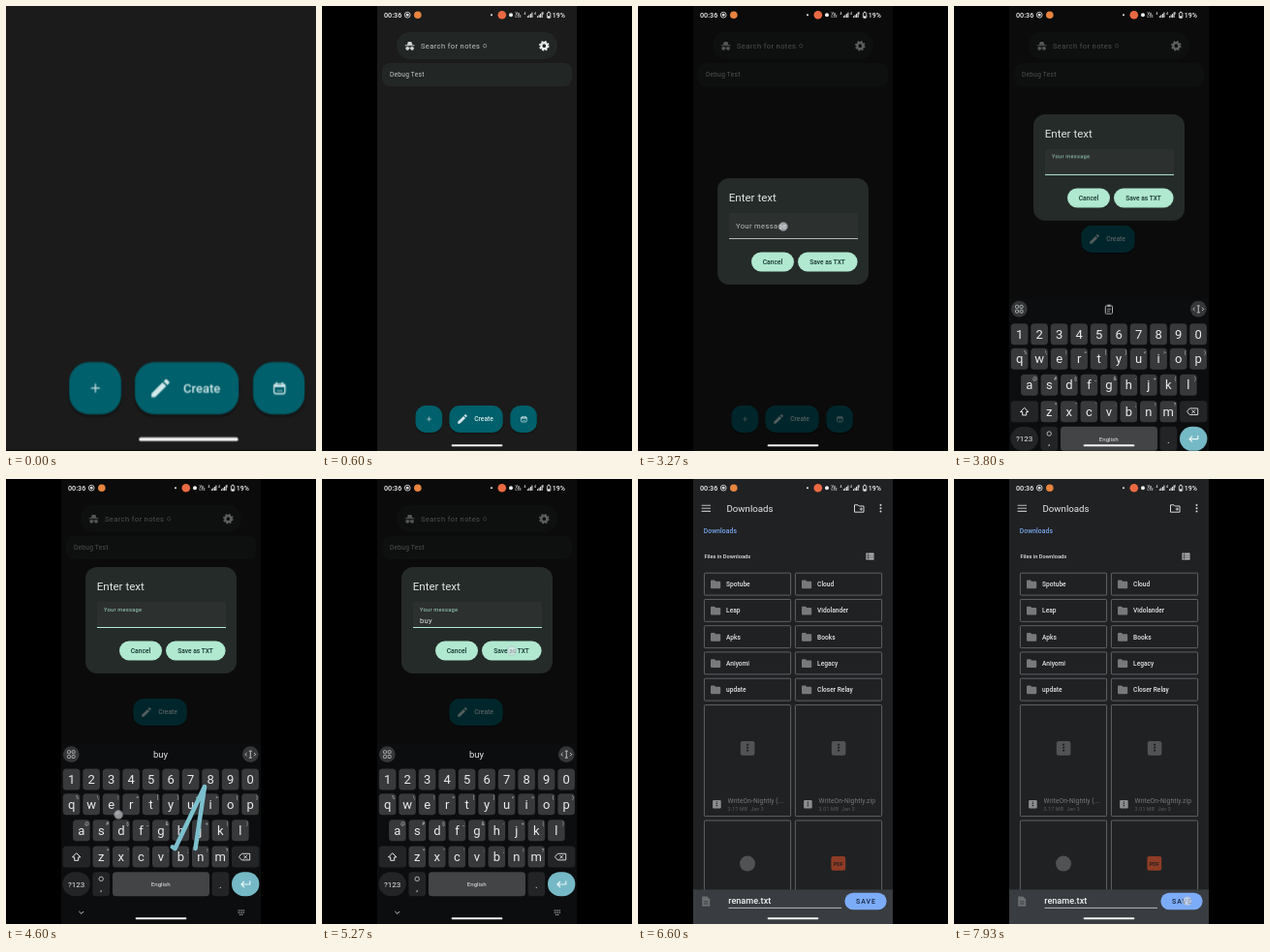
Write an HTML page that moves like this. It is 320 px wide and 460 px high and loops after 8 s.

```html
<!DOCTYPE html>
<html lang="en">
<head>
<meta charset="utf-8">
<title>Save a note as text</title>
<style>
  html, body { margin: 0; width: 100%; height: 100%; overflow: hidden; background: #000; }
  svg { display: block; width: 100vw; height: 100vh; }
  text { font-family: Roboto, "Noto Sans", sans-serif; white-space: pre; }
</style>
</head>
<body>
<svg id="stage" viewBox="0 0 320 460"></svg>
<script>
const LOOP = 8000;

// Drawing helpers
const rect = (x, y, w, h, r, fill, more = '') =>
  `<rect x="${x}" y="${y}" width="${w}" height="${h}" rx="${r}" fill="${fill}" ${more}/>`;
const disc = (x, y, r, fill, more = '') =>
  `<circle cx="${x}" cy="${y}" r="${r}" fill="${fill}" ${more}/>`;
const line = (d, stroke, width = 1, more = '') =>
  `<path d="${d}" fill="none" stroke="${stroke}" stroke-width="${width}" ${more}/>`;
const shape = (d, fill, more = '') => `<path d="${d}" fill="${fill}" ${more}/>`;
const text = (x, y, size, str, fill, { weight = 400, gap = 0, anchor = 'start' } = {}) =>
  `<text x="${x}" y="${y}" font-size="${size}" fill="${fill}" font-weight="${weight}"
    letter-spacing="${gap}" text-anchor="${anchor}">${str}</text>`;
const group = (id, ...parts) => `<g id="${id}">${parts.join('')}</g>`;
const esc = s => s.replace('&', '&amp;').replace('<', '&lt;');

const MID = { anchor: 'middle' };
const BOLD = { weight: 500 };

// Notes screen
const TEAL = '#00606b', ICE = '#d3e9ec', CARD = '#222725';

const fab = (x, w) =>
  rect(x - .5, 414.2, w + 1, 28.3, 11, '#000', 'opacity=".22"') +
  rect(x, 413.1, w, 27.8, 10.5, TEAL);

const gear = (x, y, c) =>
  disc(x, y, 3, 'none', `stroke="${c}" stroke-width="2.3"`) +
  disc(x, y, 4.5, 'none', `stroke="${c}" stroke-width="1.5" stroke-dasharray="2 1.534"`);

const pencil = shape(
  'M3 17.25V21h3.75L17.81 9.94l-3.75-3.75zM20.7 7a1 1 0 0 0 0-1.4l-2.3-2.3a1 1 0 0 0-1.4 0l-1.9 1.8 3.8 3.8z',
  ICE, 'transform="translate(138.6 420.6) scale(.535)"');

const hat =
  shape('M87.8 40.2l1-3.2h3.6l1 3.2z', '#d2d6d4') +
  rect(85.7, 40.2, 9.8, 1.1, .5, '#d2d6d4') +
  disc(88.2, 43.8, 1.9, '#d2d6d4') + disc(93, 43.8, 1.9, '#d2d6d4') +
  line('M89 43.4h3', '#d2d6d4', .8);

const notes =
  rect(57, 0, 206, 460, 0, '#1b1b1b') +
  rect(77, 27, 166, 28, 14, CARD) + hat +
  text(102, 43.8, 7.5, 'Search for notes', '#c2c7c4', { gap: .4 }) +
  rect(166.6, 39.4, 3, 3.6, 1.4, 'none', 'stroke="#a9aeab" stroke-width=".7"') +
  gear(229.3, 41.2, '#eceeed') +
  rect(62, 59, 196, 24, 8, CARD) +
  text(70, 73.4, 6.6, 'Debug Test', '#c6ccc9', { gap: .25 }) +
  group('sideFabs',
    fab(96.5, 27.7), line('M108.1 427h4.7M110.45 424.6v4.8', ICE, .6),
    fab(194.3, 27.5),
    rect(205.5, 424.8, 5.8, 5.2, 1.2, 'none', `stroke="${ICE}" stroke-width=".7"`),
    line('M205.5 425.9h5.8', ICE, 1.1), line('M206.9 423.8v1.4M209.9 423.8v1.4', ICE, .7),
    line('M207 428.4h3', ICE, .8, 'opacity=".5"')) +
  group('create', fab(131.4, 55.3), pencil, text(157.2, 429.4, 6.7, 'Create', ICE, BOLD));

// Dialog
const MINT = '#b0e8d0';
const dialog = group('dialog',
  rect(82, 178, 156, 110, 12, '#252b28'),
  text(93.7, 202.2, 11.6, 'Enter text', '#dfe4e1'),
  shape('M94 241v-25q0-2 2-2h129q2 0 2 2v25z', '#2c302e'),
  line('M94 240.5h133', '#bfc8c3', .9),
  group('focusLine', line('M94 240.5h133', '#b4e6dc', 1.2)),
  `<g id="label">${text(0, 0, 7.6, 'Your message', 'currentColor', { gap: .36 })}</g>`,
  group('typed', text(101, 236.2, 7.6, 'buy', '#dfe4e1', { gap: .3 })),
  rect(117, 254.5, 44, 20, 10, MINT), rect(165, 254.5, 61.6, 20, 10, MINT),
  text(139, 266.9, 6.7, 'Cancel', '#12332b', { ...BOLD, ...MID }),
  text(195.6, 266.9, 6.6, 'Save as TXT', '#12332b', { ...BOLD, ...MID }));

// Keyboard
const KEY = '#37393b', INK = '#e9ebec';
const keyRow = (letters, hints, x0, y) => [...letters].map((ch, i) => {
  const x = x0 + i * 20.5;
  return rect(x - 8.8, y - 11, 17.6, 22, 3.5, KEY) +
    text(x, y + 4.6, 13, ch, INK, MID) +
    (hints ? text(x + 7.8, y - 5, 5, esc(hints[i]), '#c3c6c8', { anchor: 'end' }) : '');
}).join('');

const keyboard = group('keyboard',
  rect(57, 274, 206, 187, 0, '#0c0d0e'),
  disc(67.3, 284.6, 8.4, '#343638'), disc(252.3, 284.6, 8.4, '#343638'),
  [[65, 282.2], [69.6, 282.2], [65, 287], [69.6, 287]].map(([x, y]) =>
    rect(x - 1.5, y - 1.5, 3, 3, .8, 'none', 'stroke="#c6c9cb" stroke-width=".8"')).join(''),
  line('M252.3 281.5v6.4M250.8 281.2h3M250.8 288.2h3M248.6 283l-1.7 1.7 1.7 1.7M256 283l1.7 1.7-1.7 1.7', '#d0d3d5', .9),
  group('clip',
    rect(156.3, 281.2, 7.2, 8.2, 1, 'none', 'stroke="#c6c9cb" stroke-width=".9"'),
    line('M158.3 281.2h3.2', '#c6c9cb', 1.8), line('M158 284.7h4M158 286.9h3', '#c6c9cb', .8)),
  group('hint', text(159.5, 288, 9.5, 'buy', '#dfe2e4', MID)),
  keyRow('1234567890', '', 67.6, 310.6),
  keyRow('qwertyuiop', '%\\|=[]<>{}', 67.6, 336.2),
  keyRow('asdfghjkl', '@#$_&-+()', 77.9, 363.2),
  keyRow('zxcvbnm', '*"\':;!?', 98.3, 390.6),
  rect(58.6, 379.6, 28.4, 22, 3.5, '#222426'), rect(233, 379.6, 28.4, 22, 3.5, '#222426'),
  line('M72.7 386.7l-4.2 4.2h2.2v3.4h4v-3.4h2.2z', INK, 1),
  line('M243.3 387.3h8.4v6.6h-8.4l-2.8-3.3zM245.4 388.9l3.6 3.6M249 388.9l-3.6 3.6', INK, .9),
  rect(58.4, 406.2, 28.4, 25, 12.5, '#222426'),
  text(72.6, 421.6, 8, '?123', INK, MID),
  rect(89.4, 406.2, 17.6, 25, 3.5, '#222426'),
  disc(98.2, 413.4, 2.2, 'none', `stroke="${INK}" stroke-width=".7"`),
  text(98.2, 425.6, 9, ',', INK, MID),
  rect(110, 406.2, 100, 25, 3.5, '#424446'),
  text(159.7, 421, 6.1, 'English', INK, MID),
  rect(212.6, 406.2, 17.6, 25, 3.5, '#222426'), text(221.4, 423.4, 10, '.', INK, MID),
  rect(233, 406.2, 28.4, 25, 12.5, '#76b9c6'),
  line('M251.8 415.4v3.6h-8.6M246 416l-3 3 3 3', '#e8f6f8', 1.2),
  line('M75.4 447l2.4 2.4 2.4-2.4', '#c6c9cb', 1),
  line('M239.5 446h7M239.5 448.2h7M241 450.4h4', '#b4b7b9', 1, 'stroke-dasharray="1.2 .6"'),
  group('trail', line('M195.5 382L205 318L174.5 382L116 347L128 338', '#7cc0cd', 4.6,
    'pathLength="1" stroke-dasharray="1 2" stroke-linecap="round" stroke-linejoin="round" id="stroke"')));

// File picker
const GREY = '#b9bcbe', DIM = '#77797b', EDGE = '#67696b';
const folders = ['Spotube', 'Cloud', 'Leap', 'Vidolander', 'Apks', 'Books', 'Aniyomi', 'Legacy', 'update', 'Closer Relay'];
const frame = (x, y, h) => rect(x, y, 89.2, h, .8, 'none', `stroke="${EDGE}" stroke-width=".9"`);

const folder = (name, i) => {
  const x = 68.4 + i % 2 * 94, y = 97.2 + Math.floor(i / 2) * 27.25;
  return frame(x, y, 22.9) +
    shape(`M${x + 6.6} ${y + 8.2}q0-1 1-1h3l1.2 1.3h4q1 0 1 1v5.6q0 1-1 1h-8.200q-1 0-1-1z`, '#77797b') +
    text(x + 22.7, y + 14, 6.6, name, '#e2e4e6', BOLD);
};

const zipMark = (x, y, s, c) => rect(x - s / 2, y - s / 2, s, s, s * .14, c) +
  line(`M${x} ${y - s * .32}v${s * .64}`, '#202123', s * .15, `stroke-dasharray="${s * .12} ${s * .09}"`);

const archive = (x, name, info) => frame(x, 233.6, 115) +
  zipMark(x + 44.7, 278.4, 14.6, '#515355') + zipMark(x + 13, 336.2, 8.6, '#8b8d8f') +
  text(x + 24.2, 335.2, 6.7, name, DIM, { gap: .1 }) +
  text(x + 24.2, 343.2, 5.2, info, '#5b5d5f', { gap: .2 });

const picker = group('picker',
  rect(30, 0, 240, 460, 0, '#202123'),
  line('M65.6 27.2h9.4M65.6 30.3h9.4M65.6 33.4h9.4', GREY, 1.1),
  text(91.4, 34, 9.7, 'Downloads', '#e8eaec'),
  line('M223.5 26.800h3.500l1.200 1.200h4.800v6.200h-9.500z', '#d6d8da', 1),
  line('M228.700 31.100h3.200M230.300 29.500v3.200', '#d6d8da', .9),
  [27.1, 30.3, 33.5].map(y => disc(250.5, y, 1, '#d6d8da')).join(''),
  text(67.8, 56.3, 6.7, 'Downloads', '#78a9ee', { weight: 500, gap: .1 }),
  text(68.4, 82.3, 5.7, 'Files in Downloads', '#e2e4e6', BOLD),
  rect(235.4, 76.6, 8.2, 6.8, .5, GREY),
  line('M235.4 78.900h8.200M235.4 81.200h8.200M237.700 76.600v6.800', '#202123', .6),
  group('files',
    folders.map(folder).join(''),
    archive(68.4, 'WriteOn-Nightly (...', '3.17 MB  Jan 3'),
    archive(162.4, 'WriteOn-Nightly.zip', '3.01 MB  Jan 3'),
    frame(68.4, 353, 110), frame(162.4, 353, 110),
    disc(113, 397.6, 8, '#505254'),
    rect(199.4, 390, 14.8, 14.8, 2, '#8e3c25'),
    text(206.8, 399.6, 5.4, 'PDF', '#2a2020', { weight: 700, anchor: 'middle' })),
  rect(30, 424.4, 240, 36, 0, '#393c40'),
  shape('M66.200 431.400h5l3 3v7.400h-8z', '#6b6e71'),
  line('M68 436.800h4.400M68 439h4.400', '#393c40', .9),
  text(93.3, 439.4, 9.1, 'rename.txt', '#f1f3f4', BOLD),
  line('M93.400 443.400h116.600', '#c3c6c8', .9),
  rect(213.4, 427.7, 43.2, 17.6, 8.8, '#7cacf8'),
  text(235.4, 439, 7, 'SAVE', '#15233c', { weight: 500, gap: .9, anchor: 'middle' }));

// System bars
const W = '#f2f2f2';
const bars = group('bars',
  text(64, 11.8, 7.2, '00:36', W, BOLD),
  disc(88.2, 9.2, 2.900, 'none', `stroke="${W}" stroke-width=".8"`), disc(88.2, 9.2, 1.4, W),
  disc(98.8, 9.2, 3.8, '#e8843f'),
  disc(175, 9.2, 1, W), disc(185.8, 9.2, 4.3, '#ea6a43'), disc(195, 9.2, 2, W),
  text(199.6, 8.6, 3.7, 'Vo', W, BOLD), text(199.6, 12.2, 3.7, 'LTE', W, BOLD),
  text(208.4, 9, 3.4, '4', W, BOLD), text(219, 9, 3.4, '4', W, BOLD),
  [212.4, 222.6].map(x => line(`M${x} 10.4v1.6M${x + 1.5} 9.200v2.800M${x + 3} 8v4M${x + 4.5} 6.600v5.400`, W, 1)).join(''),
  text(227, 8.8, 3.6, 'R', W),
  rect(232.4, 6.8, 3.4, 5.6, .8, 'none', `stroke="${W}" stroke-width=".8"`),
  rect(233.3, 5.7, 1.6, 1, .2, W), rect(233, 10.4, 2.2, 1.6, 0, W),
  text(237.8, 11.8, 7, '19%', W, BOLD),
  rect(133.6, 453.2, 52.8, 2, 1, '#f4f4f4'));

document.getElementById('stage').innerHTML =
  `<clipPath id="phone"><rect x="57" width="206" height="460"/></clipPath>` +
  rect(0, 0, 320, 460, 0, '#000') +
  group('camera', `<g clip-path="url(#phone)">`, notes,
    group('scrim', rect(57, 0, 206, 460, 0, '#000')),
    dialog, keyboard, picker, bars,
    group('touch', disc(0, 0, 4.5, '#e8eaf0', 'stroke="#9aa0ac" stroke-width=".6"')), '</g>');

// Motion: each step is [time, style, easing to the next step]
function play(id, ...steps) {
  const frames = steps.map(([t, style, easing = 'linear']) => ({ offset: t / LOOP, easing, ...style }));
  frames.unshift({ ...frames[0], offset: 0, easing: 'linear' });
  frames.push({ ...frames[frames.length - 1], offset: 1 });
  document.getElementById(id).animate(frames, { duration: LOOP, iterations: Infinity });
}
const at = (x, y, s = 1) => ({ transform: `translate(${x}px, ${y}px) scale(${s})` });
const fade = opacity => ({ opacity });
const show = (id, t) => play(id, [t, fade(0)], [t, fade(1)]);
const hide = (id, t) => play(id, [t, fade(1)], [t, fade(0)]);
const SMOOTH = 'cubic-bezier(.4, 0, .2, 1)';
const SETTLE = 'cubic-bezier(.2, 0, 0, 1)';

play('camera', [0, at(-122, -433.4, 1.94), SMOOTH], [520, at(0, 0)]);

play('scrim', [1330, fade(0)], [1500, fade(.6)]);
play('dialog',
  [1330, { ...at(0, 0), ...fade(0) }], [1480, { ...at(0, 0), ...fade(1) }],
  [3662, { ...at(0, 0), ...fade(1) }, SMOOTH], [3947, { ...at(0, -87), ...fade(1) }]);
play('label',
  [3320, { ...at(101, 229.8), color: '#b9c0bc' }, SMOOTH],
  [3470, { ...at(101, 223.6, .75), color: '#a3dac8' }]);
play('focusLine', [3320, fade(0)], [3470, fade(1)]);

play('keyboard', [3640, at(0, 186), SMOOTH], [3925, at(0, 0)]);
play('create', [3640, at(0, 0)], [3640, at(0, -186)]);
hide('sideFabs', 3640);

hide('clip', 4480);
show('hint', 4480);
play('stroke',
  [4450, { strokeDashoffset: 1 }], [4600, { strokeDashoffset: .37 }], [4690, { strokeDashoffset: 0 }]);
play('trail', [4450, fade(0)], [4450, fade(1)], [4700, fade(1)], [4840, fade(0)]);
show('typed', 4800);

play('picker',
  [5600, at(20.6, 0), SETTLE], [6050, at(0, 0)]);
play('picker', [5600, fade(0)], [5700, fade(1)]);
show('files', 6270);

// Finger: [time, x, y] stops of each touch
const touches = [
  [[1130, 110.5, 427], [1260, 110.5, 427]],
  [[3180, 150, 228], [3300, 150, 228]],
  [[4400, 195, 382], [4470, 205, 318], [4540, 174, 382], [4600, 116, 347], [4680, 128, 338]],
  [[5180, 196, 177.5], [5300, 196, 177.5]],
  [[7670, 240.8, 436.2], [LOOP, 240.8, 436.2]],
];
const finger = touches.flatMap(stops => {
  const [t0, ...from] = stops[0], [t1, ...to] = stops[stops.length - 1];
  const move = stops.map(([t, x, y]) => [t, { ...at(x, y), ...fade(.62) }]);
  const start = [t0, { ...at(...from), ...fade(0) }], end = [t1, { ...at(...to), ...fade(0) }];
  return t1 < LOOP ? [start, ...move, end] : [start, ...move];
});
play('touch', [0, fade(0)].concat ? [0, { ...at(110.5, 427), ...fade(0) }] : null, ...finger);
</script>
</body>
</html>
```
